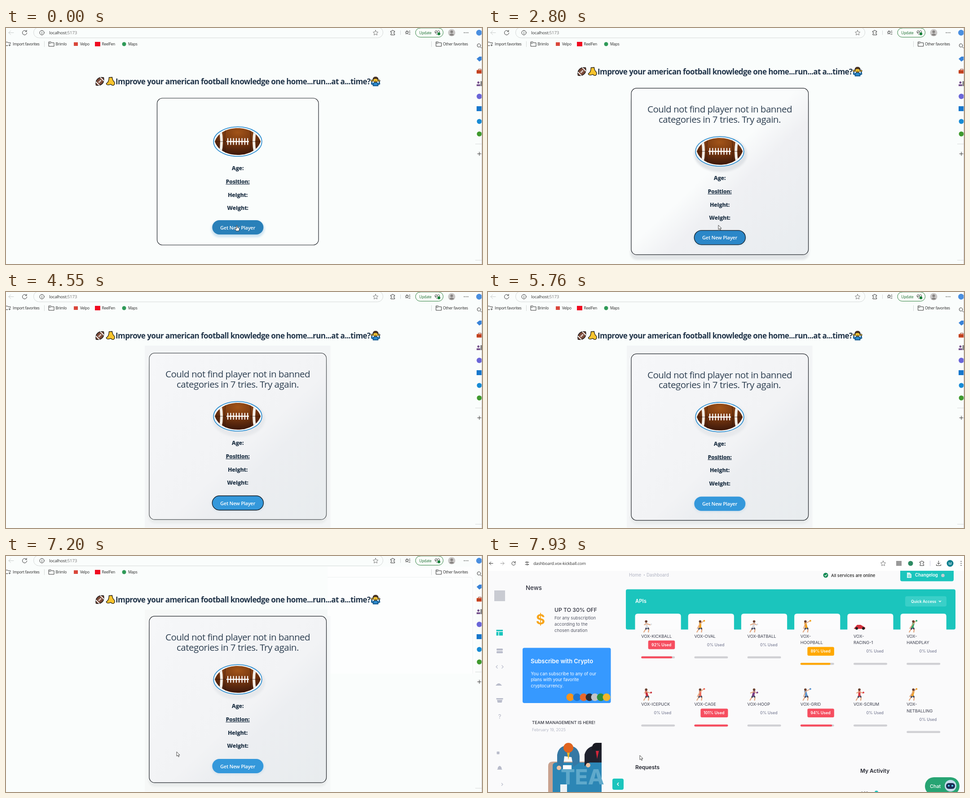
Write an HTML page that moves like this. It is 1060 px wide and 528 px high and loops after 8000 ms.

```html
<!DOCTYPE html>
<html lang="en">
<head>
<meta charset="utf-8">
<title>Player quiz</title>
<style>
html, body { margin: 0; width: 100%; height: 100%; overflow: hidden; background: #fafdfc; }
svg { display: block; width: 100vw; height: 100vh; }
text { font-family: "Open Sans", "Noto Sans", sans-serif; }
.mid { text-anchor: middle; }
.title { font-size: 17px; font-weight: 700; letter-spacing: -.58px; fill: #22354a; }
.msg { font-size: 20.5px; font-weight: 500; letter-spacing: -.5px; fill: #2c3e50; }
.label { font-size: 12.3px; font-weight: 800; letter-spacing: -.25px; fill: #2c3e50; }
.btn { font-size: 11px; font-weight: 600; letter-spacing: -.25px; fill: #fff; }
.url { font-size: 9.7px; letter-spacing: -.24px; fill: #333; }
.fav { font-size: 8.4px; letter-spacing: -.2px; fill: #222; }
.line { fill: none; stroke: #333; stroke-width: 1; stroke-linecap: round; stroke-linejoin: round; }
#dash text { font-family: Inter, "Open Sans", sans-serif; }
#dash .url { font-family: "Open Sans", sans-serif; font-size: 9.5px; }
</style>
</head>
<body>
<svg viewBox="0 0 1060 528" preserveAspectRatio="none">
<defs>
  <linearGradient id="edge" x2="1" y2="1">
    <stop offset=".47" stop-color="#fafcfc"/><stop offset=".6" stop-color="#eff0f3"/><stop offset="1" stop-color="#e8ecef"/>
  </linearGradient>
  <linearGradient id="soft" x2="1" y2="1">
    <stop offset="0" stop-color="#f6f7f9"/><stop offset=".55" stop-color="#f2f3f5"/><stop offset=".66" stop-color="#eceef1"/><stop offset="1" stop-color="#e8ecee"/>
  </linearGradient>
  <linearGradient id="low" x2="1" y2=".3">
    <stop offset="0" stop-color="#f7f9f9"/><stop offset=".55" stop-color="#eeeff2"/><stop offset="1" stop-color="#edf0f2"/>
  </linearGradient>
  <radialGradient id="leather" cx=".5" cy=".2" r=".75">
    <stop offset="0" stop-color="#a25419"/><stop offset=".5" stop-color="#73350f"/><stop offset="1" stop-color="#3c180b"/>
  </radialGradient>
  <filter id="blur" x="-20%" y="-20%" width="140%" height="140%"><feGaussianBlur stdDeviation="2"/></filter>
  <clipPath id="lowClip"><rect x="328" y="429" width="377" height="77"/></clipPath>
  <clipPath id="ballClip"><path d="M465 254C478 214 554 214 567 254C554 294 478 294 465 254Z"/></clipPath>
  <path id="arrow" d="M0 0V9.8L2.3 7.7L4 11.4L5.6 10.7L4 7.2H7Z" fill="#fff" stroke="#222" stroke-width=".8"/>
  <path id="hand" d="M-1 -6Q.3 -7 1 -5.6V-1.5L5 -.5Q6 0 5.6 2L4.6 6H-1.5L-4.6 1.5Q-4 0 -1 2Z" fill="#fff" stroke="#222" stroke-width=".9"/>
  <path id="beam" d="M-2 -5.5H2M0 -5.5V5.5M-2 5.5H2" class="line" stroke-width=".8"/>
</defs>

<g id="site">
  <rect width="1060" height="528" fill="#fafdfc"/>
  <g id="patch">
    <rect x="716" y="24" width="328" height="239" fill="#fdfefe"/>
    <path d="M716 47.5H1032Q1039.5 47.5 1039.5 55V263" fill="none" stroke="#edf0f0"/>
  </g>

  <!-- browser bar -->
  <g class="line">
    <path d="M17 10.5H6M10.5 6L6 10.5L10.5 15" stroke="#c8cccb"/>
    <path d="M45.5 7.5A5 5 0 1 0 46.5 11M46 5V8H43"/>
    <rect x="61.5" y="-2" width="778" height="24" rx="12" stroke="#d5d8d8"/>
    <circle cx="80" cy="10.5" r="5"/><path d="M80 10V13M80 8V8.2"/>
    <path id="star" d="M823 5L824.7 8.7L828.5 9.2L825.7 11.9L826.4 15.8L823 13.9L819.6 15.8L820.3 11.9L817.5 9.2L821.3 8.7Z" stroke="#777"/>
    <path id="puzzle" d="M857 7H859.5Q859.5 5 861.2 5T863 7H865.5V9.5Q863.2 9.5 863.2 11.2T865.5 13V15.5H857V13Q859 13 859 11.2T857 9.5Z"/>
    <path d="M878.5 6V15M85.5 30V42M947.5 30V42" stroke="#d5d8d8"/>
    <path d="M893 6L894 8.5L896.5 9L894.5 11L895 13.5L893 12L890.5 13.5L891 11L889.5 9L892 8.5ZM897 7H900M898 10.5H900M897 14H900"/>
    <rect x="912" y="0" width="61.5" height="20.5" rx="10.2" stroke="#2a7d3b" fill="#fbfefb"/>
    <path d="M960 15L955.5 10Q954.5 6 958 6Q960 6 960.5 8Q961.5 6 963.5 6Q967 7 965 10.5M956 10H959L960 8.5L962 11"/>
    <path d="M-1 39.5V31.5H3L5 33H10V35M-1 39.5H4"/><path d="M8 36V40M6 38L8 40L10 38"/>
    <path d="M95.5 31H100L101.5 33H107V41H95.5ZM95.5 34H100"/>
    <path d="M958 31H962.5L964 33H969.5V41H958ZM958 34H962.5"/>
  </g>
  <circle cx="964" cy="13" r="3.2" fill="#16803a"/>
  <text class="url" x="96" y="14">localhost:<tspan fill="#777">5173</tspan></text>
  <text class="fav" x="920" y="13.5" style="fill:#176b2d">Update</text>
  <circle cx="992.5" cy="10.5" r="8" fill="#c9c7c6"/><circle cx="992.5" cy="8.5" r="3" fill="#878482"/><path d="M987 15.5Q992.5 9.5 998 15.5Q992.5 19 987 15.5Z" fill="#878482"/>
  <g fill="#333"><circle cx="1020.5" cy="10.5" r=".9"/><circle cx="1024.5" cy="10.5" r=".9"/><circle cx="1028.5" cy="10.5" r=".9"/></g>
  <text class="fav" x="15" y="38.7">Import favorites</text>
  <text class="fav" x="110.5" y="38.7">Brimlo</text>
  <rect x="151" y="32" width="9" height="8" fill="#d9463a"/>
  <text class="fav" x="165" y="38.7">Velpo</text>
  <rect x="198" y="31" width="12" height="10" fill="#f00a20"/>
  <text class="fav" x="213.5" y="38.7">ReelFen</text>
  <circle cx="263" cy="36" r="4.5" fill="#2f9a58"/>
  <text class="fav" x="272" y="38.7">Maps</text>
  <text class="fav" x="973" y="38.7">Other favorites</text>

  <!-- side rail -->
  <g>
    <circle cx="1053.5" cy="10.5" r="6.5" fill="#4a8fe0"/>
    <circle cx="1053" cy="39" r="3.7" class="line" stroke="#666"/><path d="M1056 42L1059 45" class="line" stroke="#666"/>
    <path d="M1048 69L1054 64L1060 64V71L1054 75Z" fill="#3983d8"/>
    <rect x="1048" y="94" width="12" height="8" rx="1" fill="#cf4a26"/><path d="M1052 94V92H1058V94M1048 98H1060" stroke="#8c2d13" fill="none"/>
    <circle cx="1052" cy="122" r="2.5" fill="#77558e"/><path d="M1048 130V126H1056V130Z" fill="#77558e"/><path d="M1058 119V130" stroke="#555" stroke-width="2"/>
    <circle cx="1054" cy="153" r="6" fill="#6a65d8"/>
    <rect x="1048" y="175" width="12" height="11" fill="#1677cc"/>
    <circle cx="1054" cy="209" r="5.5" fill="#168bd5"/>
    <circle cx="1054" cy="237" r="5.5" fill="#3f9a2e"/>
    <path d="M1045 259.5H1060M1045 519.5H1060" stroke="#d8dada"/><path d="M1050 281.5H1058M1054 277.5V285.5" class="line"/>
    <path d="M1059.5 0V528" stroke="#cfcacc"/>
  </g>

  <!-- heading -->
  <g id="head">
    <g transform="translate(209 119.5) rotate(-45)">
      <path d="M-12 0Q-7 -7.5 0 -7.5T12 0Q7 7.5 0 7.5T-12 0Z" fill="#7b4a39" stroke="#151515" stroke-width="1.4"/>
      <path d="M-7 -5.5V5.5M7 -5.5V5.5" stroke="#fff" stroke-width="2"/><path d="M-4 0H4M-2.5 -2V2M0 -2V2M2.5 -2V2" stroke="#fff"/>
    </g>
    <path d="M230 110.5H237Q237 117 241 121Q243 126 239 128.5Q235 129.5 233 126L228 127Q223 127 223 123.5Q229 121 230 110.5Z" fill="#f9c42e" stroke="#1d1a10" stroke-width="1.3" transform="rotate(-4 233 119)"/>
    <text class="title" x="244" y="125.7">Improve your american football knowledge one home...run...at a...time?</text>
    <g stroke="#17171a" stroke-width="1">
      <path d="M818 129V124Q823 119 828 124V129Z M818 127L814 125L815 119M828 127L832 125L831 119" fill="#2c8fd6" stroke="#1b5f94" stroke-width="2.5"/>
      <circle cx="823" cy="116" r="5.5" fill="#f7c331"/><path d="M817 116Q817 109 823 109.5Q829 109 829 116Q826 113 823 113Q819 113 817 116Z" fill="#5b3a22"/>
      <path d="M821 119H825"/><circle cx="815" cy="118" r="2" fill="#f7c331"/><circle cx="831" cy="118" r="2" fill="#f7c331"/>
    </g>
  </g>

  <!-- card -->
  <g id="wash" fill="#f3f5f6"><rect x="309" y="120" width="407" height="407"/><rect id="notch" x="716" width="6.5"/></g>
  <rect id="shade" x="317" width="398" rx="15" filter="url(#blur)"/>
  <g id="lower" clip-path="url(#lowClip)">
    <rect x="328" y="390" width="377" height="115" rx="16" fill="#f3f5f5"/>
    <rect x="338" y="390" width="357" height="104" rx="14" fill="#e5e7e9" filter="url(#blur)"/>
  </g>
  <rect id="card" rx="12" stroke-width="1.2"/>
  <rect id="lowFill" x="337" y="429" width="358" height="56" rx="10" fill="url(#low)"/>
  <g id="msg" class="mid">
    <text class="msg" x="516" y="167.2">Could not find player not in banned</text>
    <text class="msg" x="516" y="189.7">categories in 7 tries. Try again.</text>
  </g>
  <g id="body">
    <ellipse id="orb" cx="518" cy="260" rx="59" ry="40" fill="#dcdfe3" filter="url(#blur)"/>
    <ellipse cx="516" cy="254.2" rx="53.7" ry="33" fill="#fff" stroke="#2f8fd0" stroke-width="1.8"/>
    <g clip-path="url(#ballClip)">
      <rect x="460" y="220" width="112" height="68" fill="url(#leather)"/>
      <path d="M477 228Q483 254 477 280M555 228Q549 254 555 280" fill="none" stroke="#f4eee6" stroke-width="6"/>
      <path d="M465 254H567M489 224Q485 254 489 284M543 224Q547 254 543 284" fill="none" stroke="#2d1208" stroke-width=".7"/>
    </g>
    <path id="laces" d="M491 254H541" stroke="#fff" stroke-width="2.4"/>
    <text class="label mid" x="516" y="318.2">Age:</text>
    <text class="label mid" x="516" y="347.9" text-decoration="underline">Position:</text>
    <text class="label mid" x="516" y="377.6">Height:</text>
    <text class="label mid" x="516" y="407.4">Weight:</text>
    <g id="button">
      <rect id="halo" x="457" y="431" width="119" height="37" rx="18" filter="url(#blur)"/>
      <rect id="pill" x="459.3" y="430" width="114" height="32" rx="16" stroke-width="1.3"/>
      <text class="btn mid" x="516" y="450.7">Get New Player</text>
    </g>
  </g>
</g>

<g id="dash">
  <rect width="1060" height="528" fill="#fafafb"/><rect width="1060" height="33" fill="#fff"/>
  <g class="line">
    <path d="M11 16.5H3M6.5 13L3 16.5L6.5 20"/><path d="M28 16.5H36M32.5 13L36 16.5L32.5 20" stroke="#999"/>
    <path d="M60 14A4 4 0 1 0 61 17M61 12V15H58"/><path d="M83 14H85M88 14H91M83 19H86M89 19H91"/><circle cx="86.5" cy="14" r="1.5"/><circle cx="87.5" cy="19" r="1.5"/>
    <use href="#star" x="57" y="6"/><use href="#puzzle" x="105" y="6"/>
    <path d="M1003.5 11V18M1000.5 15.5L1003.5 18.5L1006.5 15.5M998.5 19V21.5H1008.5V19"/><path d="M984.5 11V22" stroke="#ccd"/>
    <path d="M1053.5 12V12.1M1053.5 16.5V16.6M1053.5 21V21.1" stroke-width="2"/>
  </g>
  <rect x="909" y="11" width="12" height="11" fill="#999"/><circle cx="941" cy="16.5" r="5.5" fill="#2d8a62"/>
  <circle cx="1029" cy="16.5" r="7.5" fill="#0a7f8e"/>
  <text class="url" x="101" y="20.3">dashboard.vox-kickball.com</text>
  <rect x="14" y="77" width="24" height="24" fill="#c9cbd2"/>

  <g fill="#b9bccb">
    <path d="M18.5 165H33V168.5H18.5ZM18.5 170H23V178H18.5ZM24.5 170H33V178H24.5Z" fill="#1bc5bd"/>
    <rect x="19" y="207" width="14" height="4.5" rx="1.5"/><rect x="19" y="213" width="14" height="4.5" rx="1.5"/>
    <path d="M17 290Q24 280 31 290Z"/><path d="M18.5 318H33.5V321H18.5ZM20 322H32L30.5 328H21.5Z"/>
    <rect x="19.5" y="437.5" width="6" height="6" rx="1"/><path d="M20 478Q22 477 22 473Q26 466 30 473Q30 477 32 478Z"/>
    <g fill="none" stroke="#b9bccb" stroke-width="1.3"><path d="M21.5 244.5L18 248L21.5 251.5M30.5 244.5L34 248L30.5 251.5M30 508L33 511L30 514"/></g>
  </g>
  <rect x="77" y="205.5" width="196.5" height="123.5" rx="4" fill="#3699ff"/>
  <g id="coins"></g>

  <!-- meeting picture -->
  <g>
    <path d="M134 528V470Q134 460 144 460H253V528Z" fill="#c9a28f"/><path d="M144 528V470Q144 462 152 462H253V528Z" fill="#2c86b5"/>
    <path d="M154 470V445Q157 424 178 424Q202 425 204 448V462L190 472L186 450L170 448L167 475Z" fill="#3578a4"/>
    <path d="M215 470V444Q220 426 240 424H253V462H226Z" fill="#20222e"/>
    <circle cx="179" cy="429" r="11" fill="#e0641f"/><path d="M231 434Q231 417 243 418H253V434Z" fill="#191a22"/>
    <path d="M176 440L179 456L182 440Z" fill="#f1b324"/><path d="M240 436L243 454L247 436Z" fill="#d6263a"/>
    <path d="M167 468H186V482H167Z" fill="#fff"/><circle cx="158" cy="474" r="5" fill="#f0c3a2"/><circle cx="223" cy="468" r="5" fill="#f0c3a2"/>
    <path d="M161 511H176V528H161Z" fill="#eef3f6"/>
  </g>
  <rect x="277" y="498" width="25" height="25" rx="4" fill="#1bc5bd"/><path d="M291 507L288 510.5L291 514" fill="none" stroke="#fff" stroke-width="1.6"/>
  <circle cx="348" cy="42.5" r="1.3" fill="#c5c7d0"/>
  <circle cx="752" cy="43" r="5.5" fill="#138a55"/><path d="M749.5 43L751.5 45L755 41" stroke="#fff" fill="none" stroke-width="1.2"/>
  <path d="M918 33H1037V52Q1037 56.5 1033 56.5H922Q918 56.5 918 52Z" fill="#1bc5bd"/><path d="M933 37H939L943 41V49H933Z" fill="#d5f4f2"/><path d="M935 43H941M935 46H941" stroke="#1bc5bd"/><circle cx="1013" cy="43.5" r="3.8" fill="#c3ced2"/>
  <rect x="307" y="74.5" width="734" height="90" rx="4" fill="#1bc5bd"/><rect x="929" y="90" width="92" height="23" rx="4" fill="#3acfc8"/><path d="M1004 100L1006.5 102.5L1009 100" fill="none" stroke="#fff" stroke-width="1.3"/>
  <g id="tiles"></g>
  <rect x="973" y="495" width="77" height="40" rx="20" fill="#27a473"/>
  <circle cx="1030" cy="514" r="13" fill="#c4dcec"/><rect x="1020" y="508" width="20" height="13" rx="6" fill="#1c2d55"/><circle cx="1026" cy="514" r="2" fill="#5bd3f4"/><circle cx="1034" cy="514" r="2" fill="#5bd3f4"/>
  <circle cx="865" cy="529" r="4" fill="#1bc5bd"/>
  <g id="words"></g>
</g>
<use id="cursor"/>
</svg>

<script>
const $ = id => document.getElementById(id);
const LOOP = 8000;
const word = (x, y, size, s, fill = "#2b2d3a", weight = 400, anchor = "start") =>
  `<text x="${x}" y="${y}" font-size="${size}" fill="${fill}" font-weight="${weight}" text-anchor="${anchor}">${s}</text>`;

for (let i = 0; i < 8; i++)
  $("laces").insertAdjacentHTML("afterend",
    `<path d="M${494 + i * 6.3} 246.5V261.5" stroke="#fff" stroke-width="2.2"/>`);

$("words").innerHTML = [
  word(84, 76, 13.3, "News", "#2b2d3a", 500),
  word(117, 153, 31, "$", "#f7a51c", 700, "middle"),
  word(148, 125, 12.2, "UP TO 30% OFF", "#2b2d3a", 500),
  ...["For any subscription", "according to the", "chosen duration"].map((s, i) => word(148, 142.3 + i * 13.8, 9.6, s, "#555866")),
  word(95, 240, 12.9, "Subscribe with Crypto", "#fff", 600),
  ...["You can subscribe to any of our", "plans with your favorite", "cryptocurrency."].map((s, i) => word(95.5, 266.5 + i * 13.7, 9.7, s, "#fff")),
  word(98, 376, 9.5, "TEAM MANAGEMENT IS HERE!", "#33353f", 500),
  word(98, 391.5, 8.8, "February 19, 2025", "#b5b8c6"),
  word(26, 363.5, 13, "?", "#b0b3c3", 400, "middle"),
  word(162, 511, 47, "TEA", "#5fa9cb", 800),
  word(314, 46, 9.7, "Home", "#b0b3c2"), word(353, 46, 9.7, "Dashboard", "#b0b3c2"),
  word(764, 47, 9.4, "All services are online", "#222", 500),
  word(951, 46.3, 9.7, "Changelog", "#fff", 600),
  word(328, 105.3, 11.3, "APIs", "#fff", 600), word(942, 104.5, 8.5, "Quick Access", "#fff", 600),
  word(328, 477, 12, "Requests", "#22242e", 600), word(829, 484.5, 11.9, "My Activity", "#22242e", 600),
  word(984, 518.5, 10.8, "Chat", "#fff", 500), word(1029, 20, 8, "M", "#fff", 400, "middle"), word(831, 533, 8, "1.00", "#333")
].join("");

$("coins").innerHTML = [[183, "#f7931a"], [198, "#1b74d0"], [213, "#e8682c"], [226, "#2b2e36"], [238, "#c2c4c8"], [251, "#2f8f3d"], [264, "#f1b62a"]]
  .map(([x, c]) => `<circle cx="${x}" cy="316" r="8.5" fill="${c}"/>`).join("");

function figure(x, y, shirt, i) {
  const lean = (i % 3 - 1) * 4, arm = i % 2 ? -5 : 3;
  return `<g transform="translate(${x} ${y})" fill="none" stroke-linecap="round">
    <path d="M0 2L-4 8L-7 13M0 2L4 7L3 13" stroke="#e2a57e" stroke-width="2.3"/><path d="M0 2L-2.5 6M0 2L3 5.5" stroke="#454a61" stroke-width="3.5"/>
    <path d="M${lean / 2} -6L0 2" stroke="${shirt}" stroke-width="5"/><path d="M${lean / 2} -6L-6 ${-arm}M${lean / 2} -6L7 ${arm - 6}" stroke="#e2a57e" stroke-width="2"/>
    <circle cx="${lean / 2}" cy="-10.5" r="2.8" fill="#6b4030"/><circle cx="9" cy="${arm - 7}" r="2" fill="${shirt}"/></g>`;
}

const tiles = [
  ["VOX-KICKBALL", 92, "#dfe2e6"], ["VOX-OVAL", 0, "#f2a31b"], ["VOX-BATBALL", 0, "#d7d9de"],
  ["VOX- HOOPBALL", 89, "#f0a01c"], ["VOX- RACING-1", 0, "#d5313d"], ["VOX- HANDPLAY", 0, "#35a86b"],
  ["VOX-ICEPUCK", 0, "#c9303c"], ["VOX-CAGE", 101, "#ee6a5a"], ["VOX-HOOP", 0, "#7a3d86"],
  ["VOX-GRID", 94, "#5a93cf"], ["VOX-SCRUM", 0, "#dd3b45"], ["VOX- NETBALLING", 0, "#eea02a"]
];
$("tiles").innerHTML = tiles.map(([name, used, shirt], i) => {
  const x = 341.2 + i % 6 * 118.2, row = i < 6 ? 0 : 1, lines = name.split(" ");
  const top = 182.5 + row * 152.5, y = top + (lines.length - 1) * 14.5;
  const tone = used > 90 ? "#f64e60" : "#ffa800";
  const card = row ? "" : `<path d="M${x - 13.7} 165V135Q${x - 13.7} 129 ${x - 7.7} 129H${x + 82.5}Q${x + 88.5} 129 ${x + 88.5} 135V165Z" fill="#fcfcfd"/>`;
  const racer = `<path d="M${x + 1} 162L${x + 8} 154H${x + 16}L${x + 26} 160V163H${x + 1}Z" fill="${shirt}"/><circle cx="${x + 7}" cy="162" r="3" fill="#222"/><circle cx="${x + 22}" cy="162" r="3" fill="#222"/>`;
  const w = used > 99 ? 61 : 59.5;
  return card + (i === 4 ? racer : figure(x + 13, top - 25.5, shirt, i)) +
    lines.map((s, k) => word(x, top + k * 14.5, 9.3, s, "#3a3d4c")).join("") +
    (used ? `<rect x="${x + 75 - w}" y="${y + 6.5}" width="${w}" height="19.5" rx="3" fill="${tone}"/>` : "") +
    word(x + 67, y + 19.3, 8.8, used + "% Used", used ? "#fff" : "#7d8098", used ? 600 : 500, "end") +
    `<rect x="${x}" y="${y + 42}" width="75" height="4.6" rx="2.3" fill="#d0d0d4"/>` +
    (used ? `<rect x="${x}" y="${y + 42}" width="${Math.min(75, used * .75)}" height="4.6" rx="2.3" fill="${tone}"/>` : "");
}).join("");

// last entry whose start has passed
const held = (list, t) => list.filter(e => e[0] <= t).pop();

const drops = [[0, 0], [2800, 22], [4310, 22.6], [4430, 23.3], [4550, 24], [4670, 25], [4790, 25.7],
  [6930, 23.2], [7050, 22], [7350, 24.3], [7500, 25.7]];
const blues = [[0, "#2980b9", 0], [2800, "#2b87c8", .8], [2930, "#3090d2", 1.4], [3050, "#3498db", 2]];
const cursors = [[0, "hand", 514, 448], [2800, "arrow", 513, 441], [2930, "arrow", 560, 428], [3050, "arrow", 612, 412],
  [3190, "arrow", 607, 412], [3330, "arrow", 586, 420], [3480, "arrow", 570, 421], [4160, "arrow", 363, 238],
  [4310, ""], [6930, "beam", 511, 393], [7050, "arrow", 450, 415], [7200, "arrow", 380, 438], [7350, "arrow", 338, 446]];

function set(id, attrs) {
  for (const k in attrs) $(id).setAttribute(k, attrs[k]);
}
const show = (id, on) => set(id, { display: on ? "inline" : "none" });
const shift = (id, y) => set(id, { transform: `translate(0 ${y})` });

function draw(t) {
  const found = t >= 2800, washed = t >= 4310, lifted = t >= 6930 && t < 7350;
  const dy = held(drops, t)[1], top = 112.7 + dy;
  const dash = t >= 7930;
  show("site", !dash);
  show("dash", dash);

  shift("head", found ? -22 : 0);
  shift("body", dy);
  shift("msg", dy);
  show("msg", found);
  show("patch", t >= 6660);

  show("wash", washed);
  set("wash", { opacity: lifted ? .6 : 1 });
  const notch = t >= 6660 ? 134 : 120;
  set("notch", { y: notch, height: 527 - notch });
  show("shade", found);
  set("shade", { y: top + 18, height: washed ? 363 : 366, fill: washed ? "#e9ecec" : "#e3e6e8" });

  const pressed = t >= 500 && !found;
  for (const id of ["lower", "lowFill"]) {
    show(id, pressed);
    set(id, { opacity: t < 620 ? .5 : 1 });
  }

  const box = found ? { x: 319, y: top, width: 394.5, height: 372.4 } : { x: 336.5, y: 157, width: 359.5, height: 328.5 };
  set("card", { ...box, fill: washed ? "url(#soft)" : found ? "url(#edge)" : "#fafdfc",
    stroke: washed && t < 4790 ? "#4a4e52" : "#20242a" });
  set("orb", { opacity: !found ? 0 : washed ? .5 : .85 });

  const [, blue, sink] = held(blues, t);
  const focus = t >= 500 && t < 5760;
  shift("button", sink);
  set("pill", { fill: blue, stroke: focus ? "#101820" : "none" });
  set("halo", { fill: washed ? "#c9dcea" : "#cfe4f1", opacity: t < 500 ? 1 : washed ? .55 : .75,
    height: t < 500 ? 37 : 34 });

  const [, kind, x, y] = held(cursors, t);
  show("cursor", kind);
  if (kind) set("cursor", { href: "#" + kind, x, y });
}

const start = performance.now();
function tick() {
  draw((performance.now() - start) % LOOP);
  requestAnimationFrame(tick);
}
tick();
</script>
</body>
</html>
```
